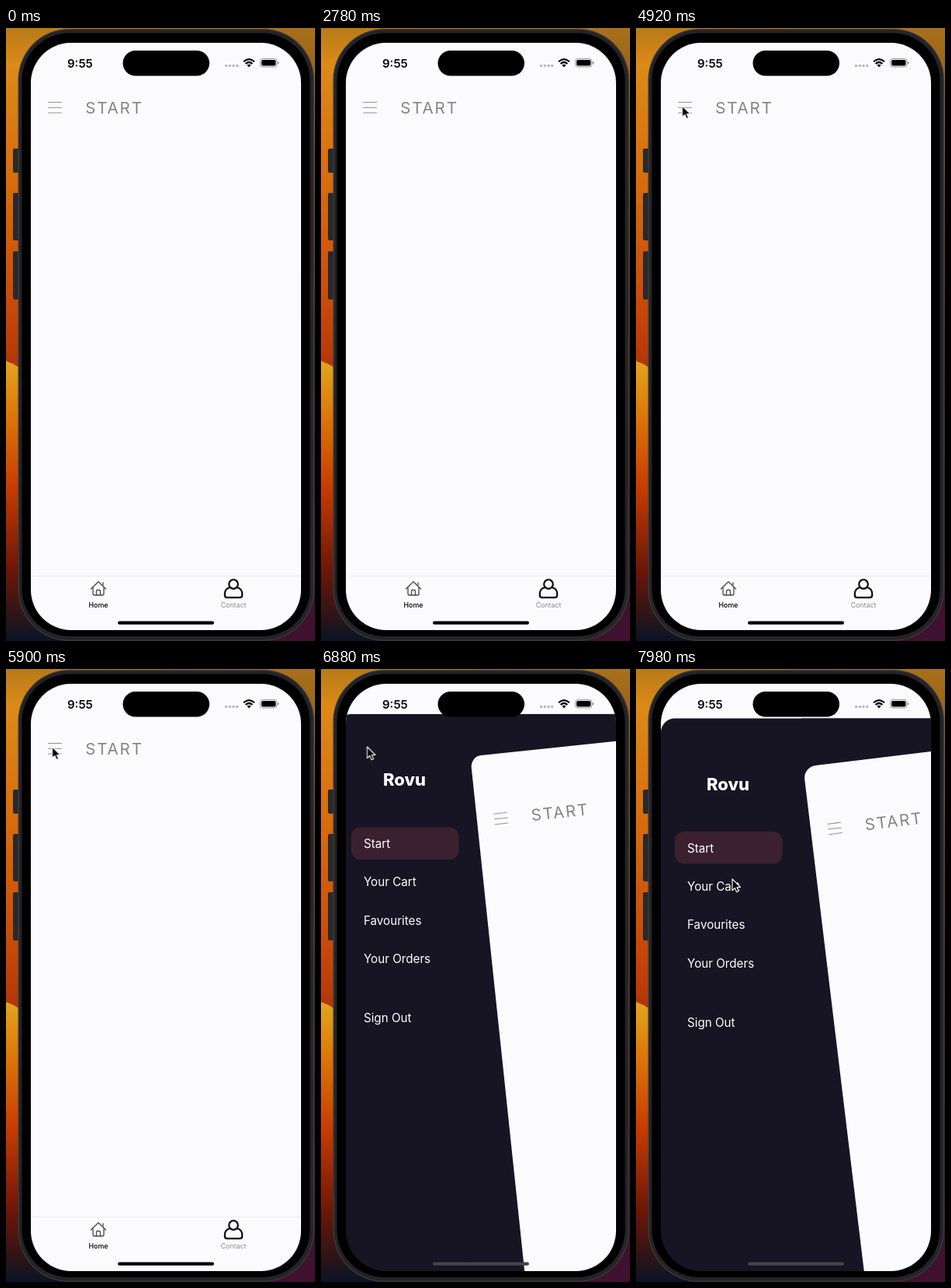
These frames come from a looping animation (398 px wide and 788 px high, 8000 ms). An HTML page:

```html
<!DOCTYPE html>
<html lang="en">
<head>
<meta charset="utf-8">
<title>Drawer</title>
<style>
@property --p { syntax: "<number>"; inherits: true; initial-value: 0; }

html, body { margin: 0; width: 100%; height: 100%; overflow: hidden; background: #a54600; }
svg { display: block; width: 398px; height: 788px; font-family: Inter, Roboto, sans-serif; animation: open 8s infinite; }

/* --p runs from 0 (closed) to 1 (drawer fully open) */
@keyframes open {
  0% { --p: 0; }
  80.45% { --p: 0; animation-timing-function: cubic-bezier(.16, 1, .3, 1); }
  99.2%, 100% { --p: 1; }
}
.drop { transform: translateY(calc(var(--p) * 44.5px)); }
.drawer { transform: translateX(calc((var(--p) - 1) * 88px)); }
.backing { transform: translateX(calc(var(--p) * 181.5px)); }
.card {
  transform: translate(calc(var(--p) * 183.3px), calc(var(--p) * 107px)) rotate(calc(var(--p) * -6.9deg));
}
.sheet { rx: calc(var(--p) * 16px); }

.tabs { animation: tabs 8s infinite step-end; }
@keyframes tabs { 0% { visibility: visible; } 80.6%, 100% { visibility: hidden; } }

.indicator { animation: indicator 8s infinite linear; }
@keyframes indicator { 0%, 82.2% { fill: #000; } 85.8%, 100% { fill: #454349; } }

.cursor { animation: cursor 8s infinite ease-in-out; }
@keyframes cursor {
  0%, 35% { transform: translate(402px, 260px); }
  45%, 50% { transform: translate(100.5px, 106px); }
  60%, 93% { transform: translate(59.5px, 100px); }
  99.5%, 100% { transform: translate(124px, 270px); }
}

.dark { fill: #171423; }
.light { fill: #fbfbfd; }
.line { fill: none; stroke-linecap: round; stroke-linejoin: round; }
.menu { font-size: 15.2px; fill: #fff; }
</style>
</head>
<body>
<svg viewBox="0 0 398 788">
  <defs>
    <linearGradient id="sky" x2="0" y2="1">
      <stop offset="0" stop-color="#b87a18"/>
      <stop offset=".06" stop-color="#dc8a18"/>
      <stop offset=".25" stop-color="#d86c0c"/>
      <stop offset=".45" stop-color="#c94a08"/>
      <stop offset=".56" stop-color="#b03408"/>
    </linearGradient>
    <linearGradient id="dune" x2="0" y2="1">
      <stop offset="0" stop-color="#e2a61c"/>
      <stop offset=".2" stop-color="#dc7608"/>
      <stop offset=".45" stop-color="#c83c00"/>
      <stop offset=".75" stop-color="#6c1608"/>
      <stop offset=".92" stop-color="#2a1418"/>
      <stop offset="1" stop-color="#081428"/>
    </linearGradient>
    <linearGradient id="dusk" x2="0" y2="1">
      <stop offset="0" stop-color="#a8701a"/>
      <stop offset=".3" stop-color="#6a3a18"/>
      <stop offset=".6" stop-color="#33222a"/>
      <stop offset="1" stop-color="#401030"/>
    </linearGradient>
    <clipPath id="screen"><rect x="32" y="19" width="348" height="755" rx="52"/></clipPath>
  </defs>

  <rect width="398" height="788" fill="url(#sky)"/>
  <path d="M0 428Q9 431 18 437H200V788H0Z" fill="url(#dune)"/>
  <rect x="200" width="198" height="788" fill="url(#dusk)"/>

  <g fill="#29292b">
    <rect x="9" y="155" width="9" height="31" rx="2"/>
    <rect x="9" y="212" width="9" height="61" rx="2"/>
    <rect x="9" y="287" width="9" height="62" rx="2"/>
  </g>
  <rect x="15.5" y="1" width="381.5" height="787" rx="66" fill="#3a393b"/>
  <rect x="17" y="2.5" width="378.5" height="784" rx="64" fill="#242326"/>
  <rect x="20.5" y="6.5" width="371" height="775.5" rx="61"/>

  <g clip-path="url(#screen)">
    <rect class="light" x="32" y="19" width="348" height="110"/>

    <g class="drop">
      <g class="drawer">
        <rect class="dark" x="32" y="19" width="440" height="800" rx="18"/>
        <text x="91" y="111" font-size="22" font-weight="800" fill="#fff">Rovu</text>
        <rect x="50" y="164.6" width="138.5" height="41.5" rx="12" fill="#3b2130"/>
        <g class="menu">
          <text x="66" y="191">Start</text>
          <text x="66" y="240.4">Your Cart</text>
          <text x="66" y="289.7">Favourites</text>
          <text x="66" y="339">Your Orders</text>
          <text x="66" y="415">Sign Out</text>
        </g>
      </g>
      <rect class="dark backing" x="32" y="19" width="348" height="800"/>
    </g>

    <g transform="translate(32 19)">
      <g class="card">
        <rect class="sheet light" width="348" height="755"/>
        <path class="line" d="M22.5 76.5h17M22.5 83.3h17M22.5 90h17" stroke="#929296"/>
        <text x="70.2" y="90.5" font-size="20.5" letter-spacing="1.9" fill="#848488">START</text>
        <g class="tabs">
          <path d="M0 685.5h348" stroke="#ececef"/>
          <g class="line" stroke="#48484b" stroke-width="1.3">
            <path d="M77.5 702 87 692.8 96.5 702M80 700v8q0 2 2 2h10q2 0 2-2v-8"/>
            <path d="M84.5 710v-5q0-1.5 1.5-1.5h2q1.5 0 1.5 1.5v5M93 694v3"/>
          </g>
          <g class="line" stroke="#0a0a0b" stroke-width="2.2">
            <circle cx="261" cy="696" r="5.8"/>
            <path d="M256 700.3Q249.8 702 249.8 708.5V710q0 3.2 3.2 3.2h16q3.2 0 3.2-3.2V708.5Q272.2 702 266 700.3"/>
          </g>
          <g font-size="8.8" text-anchor="middle">
            <text x="87" y="726" font-weight="500">Home</text>
            <text x="261" y="726" fill="#8c8c91">Contact</text>
          </g>
        </g>
      </g>
    </g>

    <text x="79" y="50.5" font-size="15" font-weight="600">9:55</text>
    <g fill-opacity=".27">
      <circle cx="283.5" cy="48.5" r="1.7"/>
      <circle cx="288.3" cy="48.5" r="1.7"/>
      <circle cx="293" cy="48.5" r="1.7"/>
      <circle cx="297.7" cy="48.5" r="1.7"/>
    </g>
    <path d="M306 43.3Q313 36.8 320 43.3M308.6 46Q313 42 317.4 46" fill="none" stroke="#000" stroke-width="2.2"/>
    <path d="M310.4 47.7Q313 45.6 315.6 47.7L313 50.4Z"/>
    <rect x="327.5" y="39.5" width="21.5" height="10.5" rx="3.3" fill="none" stroke="#000" stroke-opacity=".4"/>
    <rect x="329" y="41" width="18.5" height="7.5" rx="2"/>
    <path d="M350 43v3.5q1.5-.6 1.5-1.75T350 43" fill-opacity=".45"/>
    <rect x="150.5" y="29" width="111.5" height="32.5" rx="16.25"/>
    <rect class="indicator" x="144" y="762.5" width="124" height="4.3" rx="2.15"/>
  </g>

  <g class="cursor">
    <path d="M0 0V14.6L3.4 11.5 5.7 16.7 8.2 15.6 6 10.5H10.5Z" stroke="#fff" stroke-width="1.1" stroke-linejoin="round"/>
  </g>
</svg>
</body>
</html>
```
